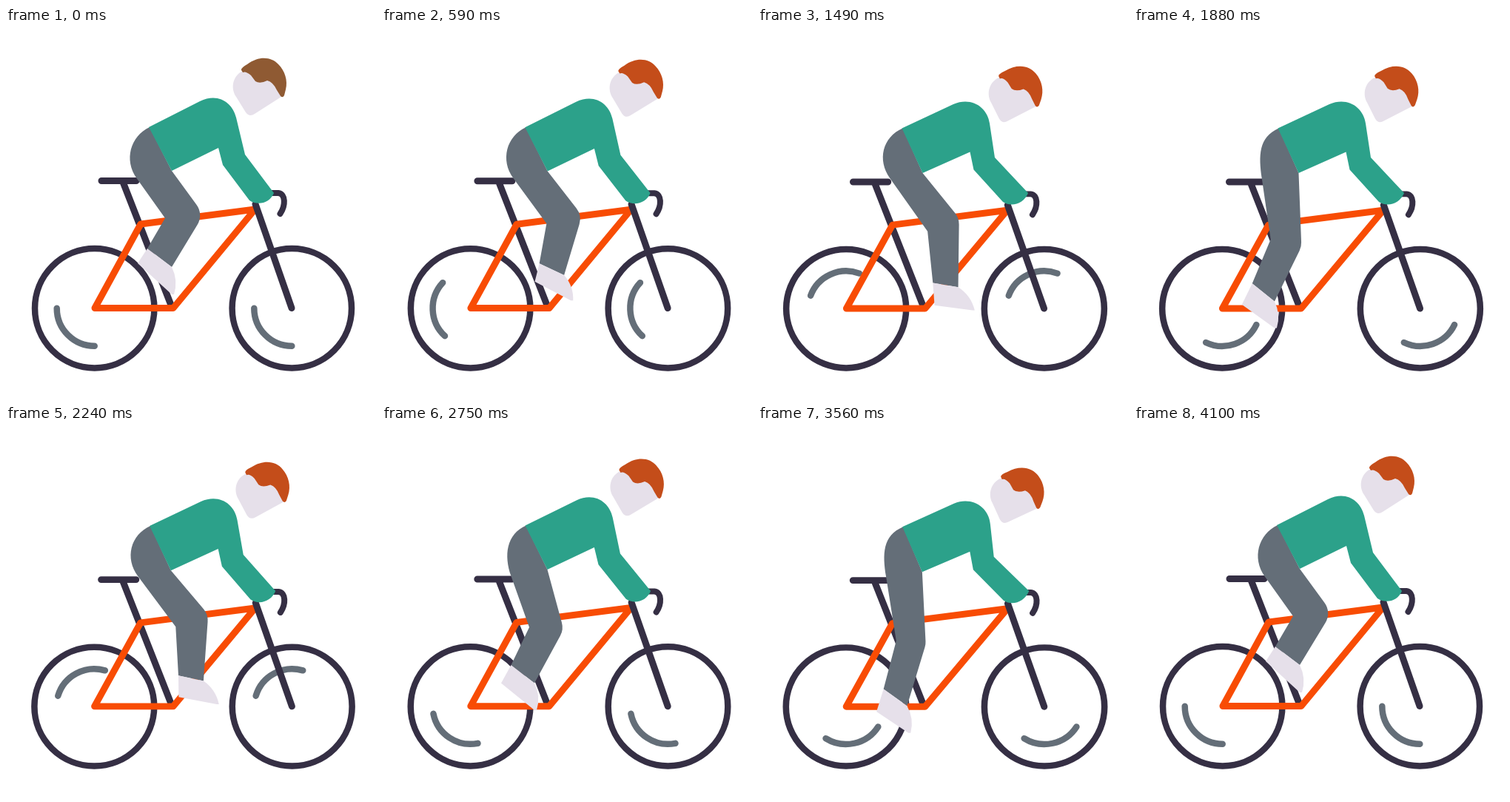
An HTML page with a canvas for the animation above (4130 ms loop, 500 by 500 pixels).

```html
<!DOCTYPE html>
<html lang="en">
<head>
<meta charset="utf-8">
<title>Cyclist</title>
<style>
  html, body { margin: 0; width: 100%; height: 100%; overflow: hidden; background: #fff; }
  canvas { display: block; width: 100vw; height: 100vh; }
</style>
</head>
<body>
<canvas width="500" height="500"></canvas>
<script>
const ctx = document.querySelector('canvas').getContext('2d');
const LOOP = 4130, HOLD = 530, STEP = 30, LAST = 120, TURNS = 4;
const DARK = '#352f44', ORANGE = '#f84c04', GREEN = '#2ca18a', GREY = '#646e78', PALE = '#e6e0ea';
const HAIR_STILL = '#8f5a33', HAIR_RIDING = '#c44d1a';

// Leg at each quarter turn of the crank: back and front of knee, back and front of ankle, heel, toe
const LEG = [
  '215,257 267,252 191,298 224,323 178,318 227,360',
  '231,273 274,255 238,342 272,347 240,372 295,378',
  '200,302 236,285 210,382 248,400 216,417 259,438',
  '183,287 224,298 158,348 188,372 144,377 191,408'
];

const TORSO_UP = 'M193 134L262 99C287 87 306 101 311 121L323 171L362 223C357 236 341 241 329 233L293 185L287 162L224 193Z';
const TORSO_DOWN = 'M196 137L266 107C290 98 314 113 315 137L317 179L368 223C362 238 345 245 333 237L290 198L286 173L221 199Z';
const FACE = 'M318 59C305 67 304 83 311 93L324 114Q329 121 336 116L372 93L360 58Z';
const HAIR = 'M318 57Q317 54 326 49C342 37 359 39 368 49C377 58 381 71 378 83L376 91Q374 95 371 92L366 84Q361 73 353 71Q343 76 337 72L331 64Q324 58 320 60Z';

const mix = (a, b, k) => a + (b - a) * k;

// Blends the numbers of two strings of the same form
function morph(from, to, k) {
  const target = to.match(/\d+/g);
  let i = 0;
  return from.replace(/\d+/g, v => mix(+v, +target[i++], k));
}

function fill(path, color) {
  ctx.fillStyle = color;
  ctx.fill(new Path2D(path));
}

function stroke(path, color, width = 9) {
  ctx.strokeStyle = color;
  ctx.lineWidth = width;
  ctx.stroke(new Path2D(path));
}

// Degrees turned after n steps: steady speed, braking evenly after a given step
function turned(n, speed, brake) {
  const surplus = speed * LAST - 360 * TURNS;
  return speed * n - surplus * (Math.max(0, n - brake) / (LAST - brake)) ** 2;
}

function wheel(x, turn) {
  ctx.lineWidth = 8.5;
  ctx.strokeStyle = DARK;
  ctx.beginPath();
  ctx.arc(x, 378.7, 80.7, 0, 2 * Math.PI);
  ctx.stroke();
  ctx.strokeStyle = GREY;
  ctx.beginPath();
  ctx.arc(x, 378.7, 51, turn + Math.PI / 2, turn + Math.PI);
  ctx.stroke();
}

// The whole bike squashes a little under the rider
function bike(turn, dip) {
  ctx.save();
  ctx.translate(253, 464);
  ctx.scale(1 + .008 * dip, 1 - .0115 * dip);
  ctx.translate(-253, -464);
  wheel(119.7, turn);
  wheel(386.3, turn);
  stroke('M129 206.5H176M158 208L224 377', DARK);
  stroke('M120 378.5L182 265L336.5 245L226 378.5Z', ORANGE);
  stroke('M337 238L386 378.5', DARK);
  stroke('M356 223H368C378 224 378 240 370.5 251', DARK, 8);
  ctx.restore();
}

function leg(crank, dip) {
  const quarter = Math.floor(crank / 90);
  const pose = morph(LEG[quarter % 4], LEG[(quarter + 1) % 4], crank / 90 - quarter);
  const [back, front, ankle, instep, heel, toe] = pose.split(' ').map(p => p.split(',').map(Number));

  const seat = [174 + (back[0] - 195) / 8, 203];
  const dx = back[0] - seat[0], dy = back[1] - seat[1], reach = 30 / Math.hypot(dx, dy);
  const waist = [224 - 3 * dip, 193 + 6 * dip];
  ctx.fillStyle = GREY;
  ctx.beginPath();
  ctx.moveTo(194 + 3 * dip, 134 + 3 * dip);
  ctx.bezierCurveTo(168, 146 + 3 * dip, seat[0] - dx * reach, seat[1] - dy * reach, ...seat);
  ctx.lineTo(...back);
  ctx.lineTo(...ankle);
  ctx.lineTo(...instep);
  ctx.arcTo(...front, ...waist, 24);
  ctx.lineTo(...waist);
  ctx.fill();

  const bulge = [
    (instep[0] + toe[0]) / 2 + (toe[1] - instep[1]) * .2,
    (instep[1] + toe[1]) / 2 - (toe[0] - instep[0]) * .2
  ];
  fill(`M${ankle}L${instep}Q${bulge} ${toe}L${toe[0] - 3} ${toe[1]}L${heel}Z`, PALE);
}

function head(hair, dip) {
  ctx.save();
  ctx.translate(330 + 3 * dip, 118 + 18 * dip);
  ctx.rotate(.183 * dip);
  ctx.translate(-330, -118);
  fill(FACE, PALE);
  fill(HAIR, hair);
  ctx.restore();
}

function draw(n) {
  const spin = turned(n, 14.25, 83) * Math.PI / 180;
  const crank = turned(n, 13.8, 75);
  const dip = (1 - Math.cos((crank - 5) * Math.PI / 180)) / 2;
  ctx.fillStyle = '#fff';
  ctx.fillRect(0, 0, 500, 500);
  bike(spin, dip);
  leg(crank, dip);
  fill(morph(TORSO_UP, TORSO_DOWN, dip), GREEN);
  head(n ? HAIR_RIDING : HAIR_STILL, dip);
}

ctx.lineCap = ctx.lineJoin = 'round';
const start = performance.now();

function frame() {
  const t = (performance.now() - start) % LOOP;
  draw(t < HOLD ? 0 : Math.min(LAST, Math.floor((t - HOLD) / STEP) + 1));
  requestAnimationFrame(frame);
}
frame();
</script>
</body>
</html>
```
